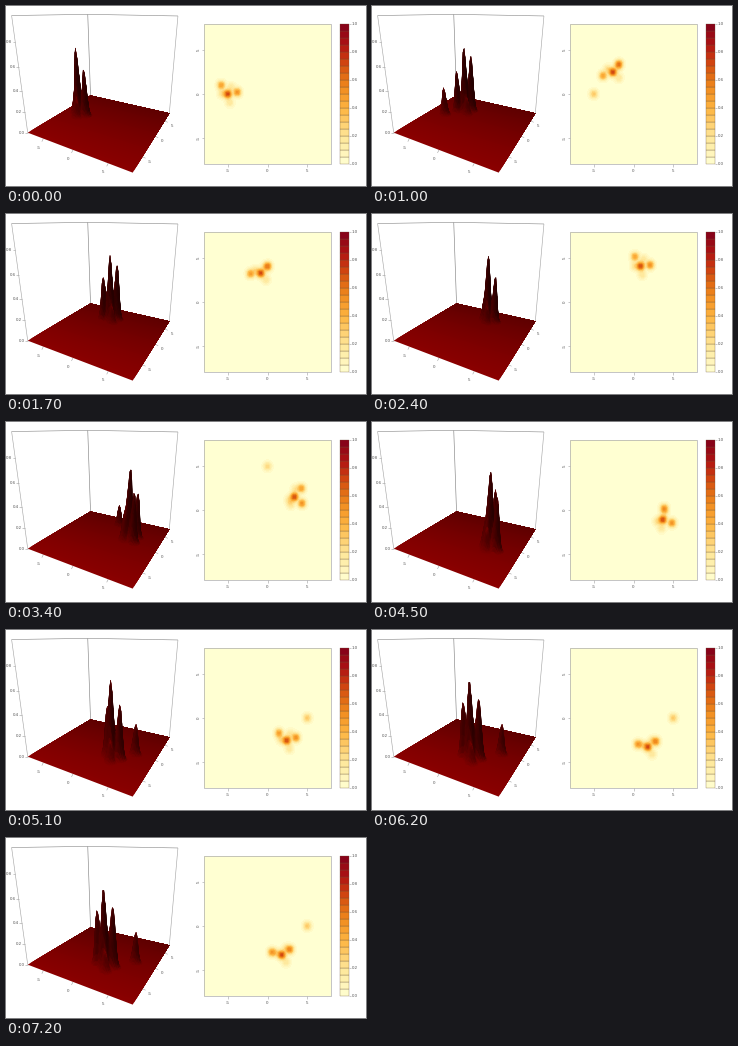
A matplotlib script for the animation above (8 s loop, 360 px wide and 180 px high).

```python
import numpy as np
import matplotlib.pyplot as plt
from matplotlib.animation import FuncAnimation
from matplotlib.collections import PolyCollection
from matplotlib.colors import LinearSegmentedColormap
from matplotlib.patches import Polygon, Rectangle

W, H = 360, 180
FRAMES, STEP = 80, 100
SIGMA = 0.33
RED = np.array([0.54, 0.0, 0.0])
INK = "0.35"

plt.rcParams["font.family"] = "Liberation Sans"
heat = LinearSegmentedColormap.from_list("heat", [
    (0, "#ffffd2"), (0.2, "#fee596"), (0.4, "#fdb440"), (0.55, "#f08a1e"),
    (0.65, "#de6412"), (0.75, "#cb3a10"), (0.85, "#b01412"), (1, "#80001a")])

# Map panel: 16 x 16 units, drawn in stage pixels
LEFT, TOP, RIGHT, BOTTOM = 198, 18, 325, 158
SX, SY = (RIGHT - LEFT) / 16, (BOTTOM - TOP) / 16
CX, CY = (LEFT + RIGHT) / 2, (TOP + BOTTOM) / 2

# Route of the main bump, in seconds and map units
ROUTE_T = [0, 1, 2.4, 3.4, 4.5, 5.4]
ROUTE_X = [-5, -2.6, 0.9, 3.4, 3.7, 1.8]
ROUTE_Y = [0, 2.5, 4.1, 1.5, -1.1, -3.3]
# Side bumps: distance, mean angle, swing, height
SIDES = [(1.3, 122, 78, .45), (1.2, 5, 46, .50), (.75, 180, -30, .19),
         (1.0, -80, 40, .18), (.9, 65, -20, .16)]
# Bumps left behind: x, y, start
TRAILS = [(-5, 0, .3), (0, 5, 2.6), (5, 0, 4.7)]


def bumps(t):
    t = min(t, ROUTE_T[-1])
    x, y = np.interp(t, ROUTE_T, ROUTE_X), np.interp(t, ROUTE_T, ROUTE_Y)
    out = [(x, y, .68)]
    sway = np.sin(2 * np.pi * t / 5 + 0.1)
    for r, mean, swing, h in SIDES:
        a = np.radians(mean + swing * sway)
        out.append((x + r * np.cos(a), y + r * np.sin(a), h))
    for tx, ty, start in TRAILS:
        rise = np.clip((t - start) / 0.3, 0, 1)
        fade = np.clip((start + 1.2 - t) / 0.5, 0, 1)
        out.append((tx, ty, 0.3 * rise * fade))
    return out


def density(x, y, t):
    return sum(h * np.exp(-((x - a) ** 2 + (y - b) ** 2) / (2 * SIGMA ** 2))
               for a, b, h in bumps(t))


def fit_camera():
    space = [(-8, -8, 0), (8, -8, 0), (8, 8, 0), (-8, 8, 0),
             (-8, -8, 1), (8, 8, 1), (-8, 8, 1)]
    stage = [(22, 126), (127, 167), (163.5, 107), (84, 90),
             (5, 10), (171.5, 10), (82.5, 8)]
    rows, rhs = [], []
    for (x, y, z), (u, v) in zip(space, stage):
        rows.append([x, y, z, 1, 0, 0, 0, 0, -u * x, -u * y, -u * z])
        rows.append([0, 0, 0, 0, x, y, z, 1, -v * x, -v * y, -v * z])
        rhs += [u, v]
    sol = np.linalg.lstsq(np.array(rows, float), np.array(rhs, float),
                          rcond=None)[0]
    return np.append(sol, 1).reshape(3, 4)


CAM = fit_camera()


def project(x, y, z):
    x, y, z = np.broadcast_arrays(x, y, z)
    p = np.stack([x, y, z, np.ones(x.shape)], -1) @ CAM.T
    return p[..., :2] / p[..., 2:]


def quads(p):
    q = np.stack([p[:-1, :-1], p[1:, :-1], p[1:, 1:], p[:-1, 1:]], 2)
    return q.reshape(-1, 4, 2)


def tone(y):
    return 1 - 0.02 * (y + 8)


fig = plt.figure(figsize=(W / 72, H / 72), dpi=72, facecolor="white")
ax = fig.add_axes([0, 0, 1, 1])
ax.set_xlim(0, W)
ax.set_ylim(H, 0)
ax.axis("off")


def line(xs, ys, color="0.65", lw=0.6):
    ax.plot(xs, ys, color=color, lw=lw, zorder=1, solid_capstyle="butt")


def label(x, y, s, ha="center", turn=0):
    ax.text(x, y, s, size=4.4, color=INK, ha=ha, va="center", rotation=turn,
            zorder=6)


def edge(a, b, color="0.65"):
    line(*np.array([project(*a), project(*b)]).T, color=color)


# Perspective box
edge((-8, -8, 0), (-8, -8, 1))
edge((8, 8, 0), (8, 8, 1))
edge((-8, 8, 0), (-8, 8, 1), "0.5")
edge((-8, -8, 1), (-8, 8, 1), "0.55")
edge((-8, 8, 1), (8, 8, 1), "0.55")

for z in np.arange(0, 0.9, 0.2):
    u, v = project(-8, -8, z)
    line([u - 2.5, u], [v, v])
    label(u - 3, v, f"{z:.1f}", "right")
for n in (-5, 0, 5):
    u, v = project(n, -8, 0)
    line([u, u - 1.5], [v, v + 3])
    label(u - 5, v + 9, str(n))
    u, v = project(8, n, 0)
    line([u, u + 3], [v, v + 1.5])
    label(u + 7, v + 5, str(n))

# Ground, darker towards the back
for y in np.linspace(-8, 8, 40, endpoint=False):
    ax.add_patch(Polygon(project([-8, 8, 8, -8], [y, y, 8, 8], 0),
                         fc=RED * tone(y), ec="none", zorder=2))

# Peaks, painted from back to front
axis = np.linspace(-8, 8, 113)
gx, gy = np.meshgrid(axis, axis, indexing="ij")
order = np.argsort((gx - gy)[:-1, :-1].ravel(), kind="stable")
peaks = PolyCollection([], linewidths=0.3, zorder=3)
ax.add_collection(peaks)


def draw_peaks(t):
    z = density(gx, gy, t)
    dx, dy = np.gradient(z * 5, axis, axis)
    norm = np.sqrt(dx ** 2 + dy ** 2 + 1)
    side = np.clip((0.5 * dx + 0.85 * dy) / norm, 0, 1)
    shade = (0.18 + 0.82 / norm + 0.25 * side ** 3) * tone(gy)
    pick = order[z[:-1, :-1].ravel()[order] > 0.008]
    colors = np.clip(shade[:-1, :-1].ravel()[pick, None] * RED, 0, 1)
    peaks.set_verts(quads(project(gx, gy, z))[pick])
    peaks.set_facecolor(colors)
    peaks.set_edgecolor(colors)


# Map panel and colour bar
def frame(zorder, **style):
    ax.add_patch(Rectangle((LEFT, TOP), RIGHT - LEFT, BOTTOM - TOP,
                           zorder=zorder, **style))


frame(1, fc=heat(0), ec="none")
frame(5, fc="none", ec="0.68", lw=0.7)
for n in (-5, 0, 5):
    u, v = CX + n * SX, CY - n * SY
    line([u, u], [BOTTOM, BOTTOM + 2.5])
    label(u, BOTTOM + 6.5, str(n))
    line([LEFT - 2.5, LEFT], [v, v])
    label(LEFT - 5, v, str(n), turn=90)

cell = (BOTTOM - TOP) / 20
for i in range(20):
    ax.add_patch(Rectangle((334, BOTTOM - (i + 1) * cell), 9, cell,
                           fc=heat((i + 0.5) / 20), ec="#6a5038", lw=0.3))
for i in range(6):
    v = BOTTOM - i * 4 * cell
    line([343, 345], [v, v])
    label(346, v, f"{i / 5:.1f}", "left")

px, py = np.meshgrid(np.arange(LEFT, RIGHT + 1), np.arange(TOP, BOTTOM + 1))
mx, my = (px - CX) / SX, (CY - py) / SY
levels = np.linspace(0.02, 1, 30)
state = {"map": None}


def draw_map(t):
    if state["map"] is not None:
        state["map"].remove()
    z = np.minimum(density(mx, my, t), 0.999)
    state["map"] = ax.contourf(px, py, z, levels=levels, cmap=heat,
                               vmin=0, vmax=1, zorder=2)
    ax.set_xlim(0, W)
    ax.set_ylim(H, 0)


def update(i):
    t = i * STEP / 1000
    draw_peaks(t)
    draw_map(t)
    return []


anim = FuncAnimation(fig, update, frames=FRAMES, interval=STEP,
                     init_func=lambda: [], repeat=True, repeat_delay=0,
                     blit=False)
plt.show()
```
